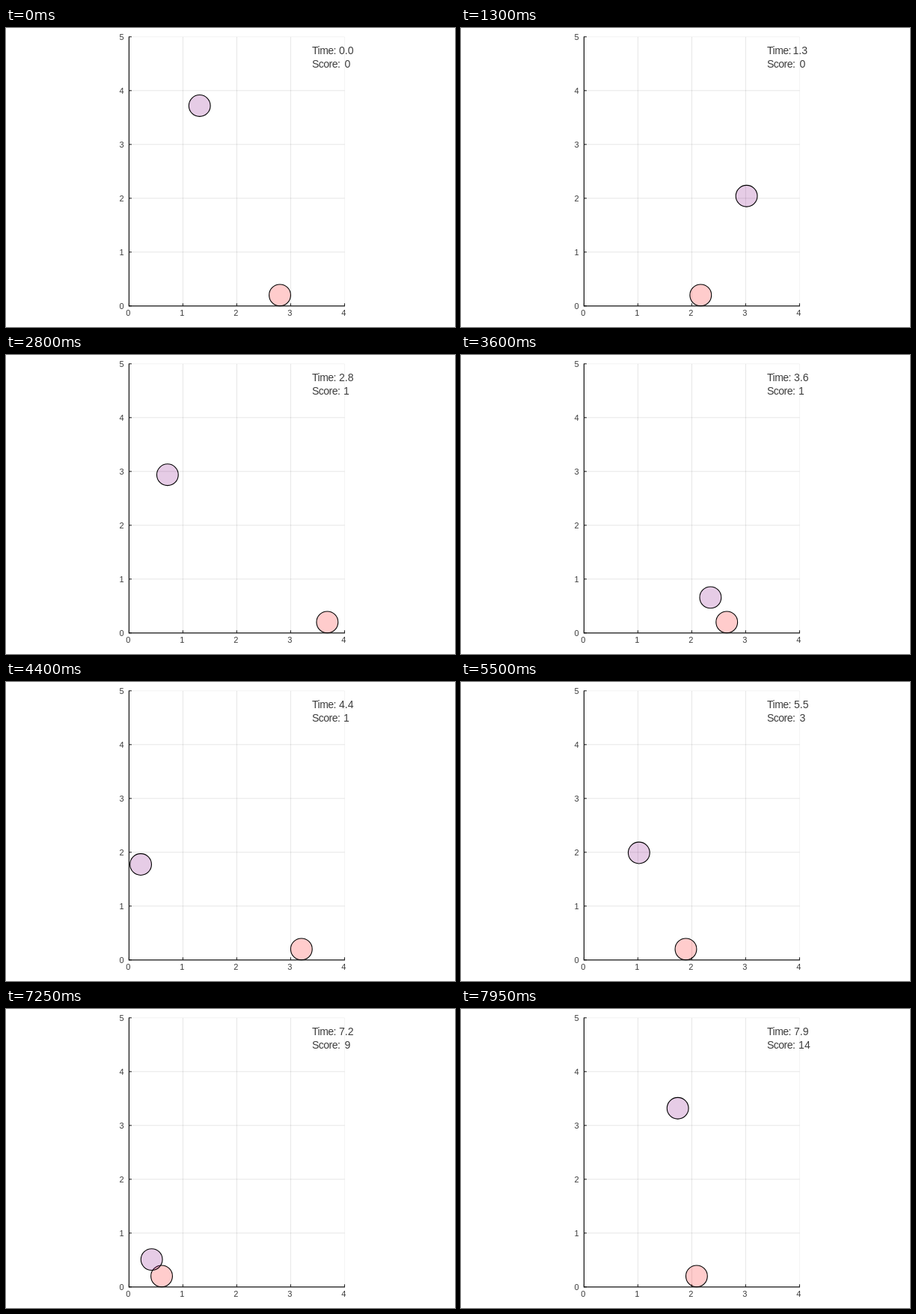
An HTML page with a canvas that plays this animation: 600x400 px, repeating every 8000 ms.

```html
<!DOCTYPE html>
<html>
<head>
<meta charset="utf-8">
<style>
html, body { margin: 0; width: 100%; height: 100%; overflow: hidden; background: #fff; }
canvas { display: block; width: 600px; height: 400px; }
</style>
</head>
<body>
<canvas id="stage"></canvas>
<script>
const LOOP = 8000, STEP = 50, UNIT = 72, X0 = 164.4, Y0 = 371.8;
const WIDTH = 4, RADIUS = 0.2, GRAVITY = 9.8;
const FONT = '"Liberation Sans", Arial, sans-serif';
const canvas = document.getElementById('stage');
const ctx = canvas.getContext('2d');
const ratio = window.devicePixelRatio || 1;
canvas.width = 600 * ratio;
canvas.height = 400 * ratio;
ctx.scale(ratio, ratio);

// Ball contacts; an x beyond a side wall is mirrored back into the box.
const contacts = [
  { t: 0, x: 1.31, y: 3.72, score: 0 },
  { t: 0.896, x: 2.235, y: 0.2, score: 0 },
  { t: 2.175, x: 4.71, y: 0.55, score: 1 },
  { t: 3.58, x: -2, y: 0.55, score: 1 },
  { t: 4.765, x: -0.754, y: 0.2, score: 3 },
  { t: 5.945, x: -1.694, y: 0.5, score: 2 },
  { t: 6.924, x: 0.292, y: 0.3, score: 2 },
  { t: 7.3, x: 0.44, y: 0.45, score: 8 },
  { t: 7.95, x: 1.74, y: 3.32, score: 14 }
];

// The player slides evenly between turning points [seconds, x].
const turns = [[0, 2.8], [0.9, 0.66], [1.7, 3.67], [2.8, 3.68], [3.6, 2.65],
  [4.4, 3.2], [4.8, 1.7], [5.5, 1.89], [6.55, 2.81], [7.2, 0.5], [7.95, 2.09]];

const mix = (a, b, k) => a + (b - a) * k;

function mirror(x) {
  const low = RADIUS, high = WIDTH - RADIUS;
  return x < low ? 2 * low - x : x > high ? 2 * high - x : x;
}

// Index of the stretch that holds time t.
function stretch(times, t) {
  let i = 0;
  while (i < times.length - 2 && t >= times[i + 1]) i++;
  return i;
}

function ballAt(t) {
  const i = stretch(contacts.map(c => c.t), t);
  const a = contacts[i], b = contacts[i + 1];
  const k = (t - a.t) / (b.t - a.t);
  const lift = GRAVITY / 2 * (t - a.t) * (b.t - t);
  return { x: mirror(mix(mirror(a.x), b.x, k)), y: mix(a.y, b.y, k) + lift };
}

function playerAt(t) {
  const i = stretch(turns.map(p => p[0]), t);
  const [a, from] = turns[i], [b, to] = turns[i + 1];
  return mix(from, to, (t - a) / (b - a));
}

// While the ball is pinned in the corner, every step scores a point.
function scoreAt(t, n) {
  const pinned = contacts[6];
  if (t >= pinned.t) return Math.min(14, pinned.score + n - Math.floor(pinned.t * 20));
  return contacts[stretch(contacts.map(c => c.t), t)].score;
}

function line(x1, y1, x2, y2, color, width = 1) {
  ctx.beginPath();
  ctx.moveTo(x1, y1);
  ctx.lineTo(x2, y2);
  ctx.strokeStyle = color;
  ctx.lineWidth = width;
  ctx.stroke();
}

function text(s, x, y, size, align = 'left', spacing = 0) {
  ctx.font = size + 'px ' + FONT;
  ctx.letterSpacing = spacing + 'px';
  ctx.textAlign = align;
  ctx.fillStyle = '#3c3c3c';
  ctx.fillText(s, x, y);
}

function disc(x, y, fill) {
  ctx.beginPath();
  ctx.arc(X0 + x * UNIT, Y0 - y * UNIT, RADIUS * UNIT, 0, Math.PI * 2);
  ctx.fillStyle = fill;
  ctx.fill();
  ctx.strokeStyle = '#000';
  ctx.lineWidth = 1.1;
  ctx.stroke();
}

function axes() {
  const ink = '#111';
  const grid = last => `rgba(0,0,0,${last ? 0.05 : 0.1})`;
  for (let i = 0; i <= 4; i++) {
    const x = X0 + i * UNIT;
    if (i) line(x, 12, x, Y0, grid(i === 4));
    line(x, Y0, x, Y0 - 3.5, ink);
    text(i, x - 1, 385, 11, 'center');
  }
  for (let i = 0; i <= 5; i++) {
    const y = Y0 - i * UNIT;
    if (i) line(X0, y, 452.5, y, grid(i === 5));
    line(X0, y, X0 + 3.5, y, ink);
    text(i, 157.6, y + 4.2, 11, 'right');
  }
  line(X0, 11.6, X0, 372.3, ink, 1.2);
  line(X0 - 0.5, Y0, 453, Y0, ink, 1.2);
}

function reading(label, value, x, y) {
  const tuck = value.startsWith('1') ? 1.5 : 0;
  text(label, 409, y, 14, 'left', -0.5);
  text(value, x - tuck, y, 14);
}

function draw(now) {
  const n = Math.floor((now % LOOP) / STEP), t = n * STEP / 1000;
  const ball = ballAt(t);
  ctx.fillStyle = '#fff';
  ctx.fillRect(0, 0, 600, 400);
  axes();
  disc(playerAt(t), RADIUS, 'rgba(255,0,0,0.2)');
  disc(ball.x, ball.y, 'rgba(128,0,128,0.2)');
  reading('Time:', (Math.floor(n / 2) / 10).toFixed(1), 445, 35);
  reading('Score:', String(scoreAt(t, n)), 452.6, 53);
}

const start = performance.now();
function tick() {
  draw(performance.now() - start);
  requestAnimationFrame(tick);
}
tick();
</script>
</body>
</html>
```
